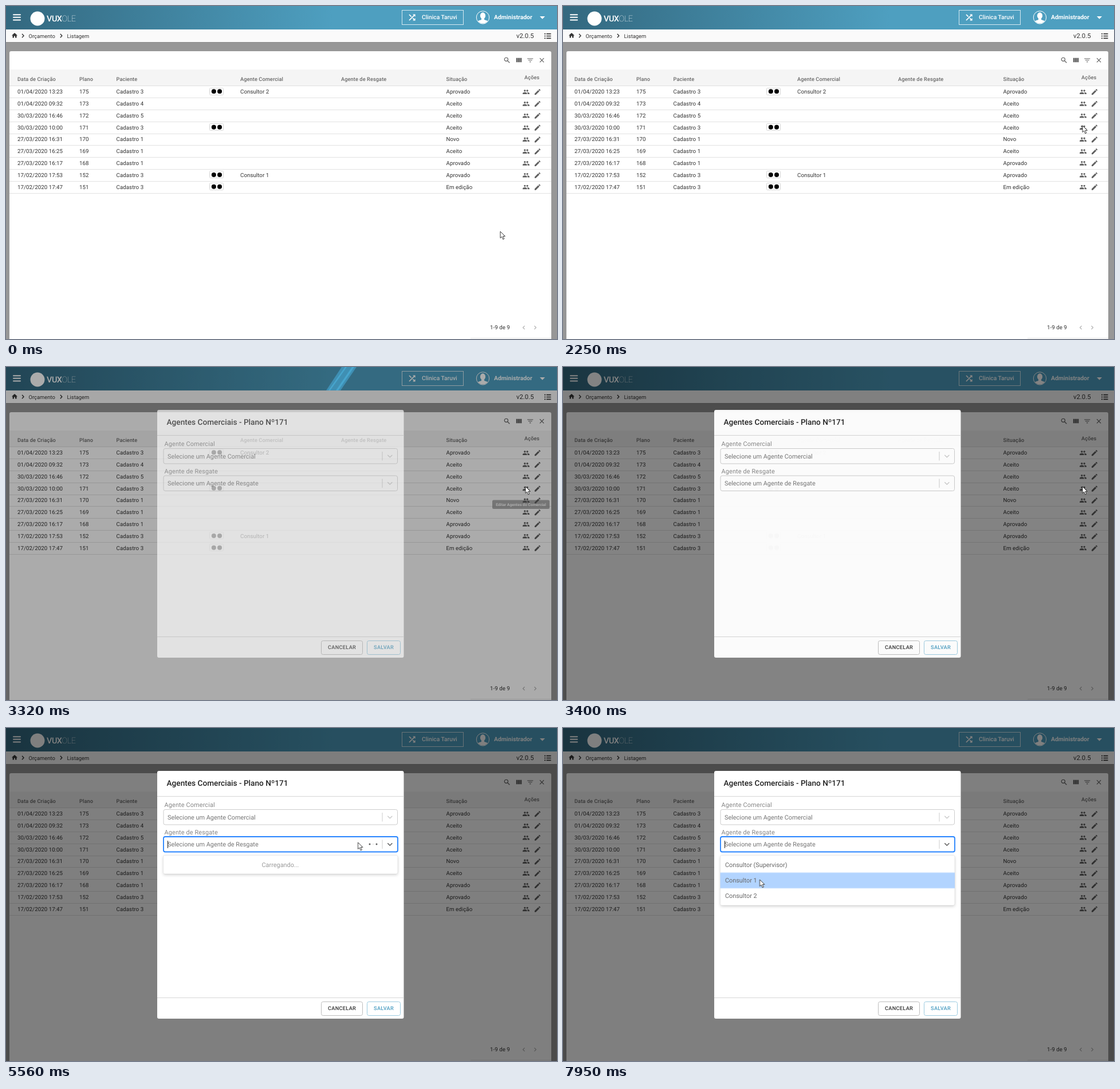
Animation, 962 px wide and 582 px high, one loop 8000 ms. Source, as an HTML page:

```html
<!DOCTYPE html>
<html lang="pt-BR">
<head>
<meta charset="utf-8">
<title>Listagem</title>
<style>
html, body { margin: 0; width: 100%; height: 100%; overflow: hidden; background: #979797; }
svg { display: block; }
text { font-family: Roboto, Arial, sans-serif; text-rendering: geometricPrecision; }
.head text { font-size: 9.2px; font-weight: 500; letter-spacing: .1px; fill: #686868; }
.cell text { font-size: 9.75px; letter-spacing: .03px; fill: #333; }
.crumb text { font-size: 9.4px; fill: #333; }
.label { font-size: 10.86px; letter-spacing: .15px; fill: #858585; }
.field { font-size: 10.86px; fill: #757575; }
.option { font-size: 10.86px; fill: #666; }
.button { font-size: 9.2px; font-weight: 500; letter-spacing: .3px; text-anchor: middle; }
.line { fill: none; stroke: #ccc; }

/* One cycle is 8 s, so 1% is 80 ms. */
.cursor, .shade, .spot, .tip, .veil, .shine, .hover, .focus, .loading, .menu, .pick, .caret {
  animation: 8s step-end infinite;
}
.cursor { animation-name: cursor; animation-timing-function: ease-in-out; }
.shade { animation-name: shade; }
.spot { animation-name: spot; }
.tip { animation-name: tip; }
.veil { animation-name: veil; }
.shine { animation-name: shine; }
.hover { animation-name: hover; }
.focus { animation-name: focus; }
.loading { animation-name: loading; }
.menu { animation-name: menu; }
.pick { animation-name: pick; }
.caret { animation-name: caret; }
.dot { animation: pulse 1s ease-in-out infinite; }

@keyframes cursor {
  0%, 7% { transform: translate(863px, 394px); }
  17.25% { transform: translate(866px, 229px); }
  18.25%, 19.3% { transform: translate(866px, 219px); }
  28.1%, 48.5% { transform: translate(907px, 209px); }
  56%, 59.2% { transform: translate(756px, 162px); }
  63.75%, 83.2% { transform: translate(614.5px, 200px); }
  93.6%, 100% { transform: translate(343.5px, 265px); }
}
@keyframes shade {
  0% { opacity: 0; transform: translateY(166.4px); }
  12.5% { opacity: 1; transform: translateY(166.4px); }
  13.2% { opacity: 1; transform: translateY(145.6px); }
  13.9% { opacity: 1; transform: translateY(124.8px); }
  14.7% { opacity: 1; transform: translateY(104px); }
  15.8% { opacity: 1; transform: translateY(83.2px); }
  20.1% { opacity: 1; transform: translateY(62.4px); }
  28.1%, 100% { opacity: 0; transform: translateY(62.4px); }
}
@keyframes spot { 0% { opacity: 0; } 28.8% { opacity: 1; } 41.45%, 100% { opacity: 0; } }
@keyframes tip {
  0% { opacity: 0; }
  37.7% { opacity: .35; }
  38.7% { opacity: .8; }
  39.6% { opacity: 1; }
  41.45% { opacity: .5; }
  42.45%, 100% { opacity: 0; }
}
@keyframes veil { 0% { opacity: 0; } 41.45% { opacity: .66; } 42.45% { opacity: .97; } 43.45%, 100% { opacity: 1; } }
@keyframes shine { 0% { opacity: 0; } 41.45% { opacity: 1; } 42.45%, 100% { opacity: 0; } }
@keyframes hover { 0% { opacity: 0; } 62.7% { opacity: 1; } 66.6%, 100% { opacity: 0; } }
@keyframes focus { 0% { opacity: 0; } 66.6%, 100% { opacity: 1; } }
@keyframes loading { 0% { opacity: 0; } 66.6% { opacity: 1; } 82.95%, 100% { opacity: 0; } }
@keyframes menu { 0% { opacity: 0; } 82.95%, 100% { opacity: 1; } }
@keyframes pick {
  0% { transform: none; fill: #deebff; }
  90.7% { transform: translateY(27.4px); fill: #deebff; }
  98.3%, 100% { transform: translateY(27.4px); fill: #b2d4ff; }
}
@keyframes caret {
  0% { opacity: 0; }
  66.6% { opacity: 1; }
  73.85% { opacity: 0; }
  80.5% { opacity: 1; }
  87.1% { opacity: 0; }
  93.6%, 100% { opacity: 1; }
}
@keyframes pulse { 0%, 80%, 100% { opacity: .1; } 40% { opacity: 1; } }
</style>
</head>
<body>
<svg width="962" height="582" viewBox="0 0 962 582">
  <defs>
    <linearGradient id="bar" gradientUnits="userSpaceOnUse" x1="0" y1="0" x2="570" y2="30">
      <stop offset="0" stop-color="#33687f"/>
      <stop offset="1" stop-color="#4e9fc0"/>
    </linearGradient>
    <filter id="drop" x="-10%" y="-30%" width="120%" height="180%">
      <feDropShadow dx="0" dy="2" stdDeviation="2.4" flood-opacity=".16"/>
    </filter>
    <clipPath id="face"><circle cx="832.5" cy="20" r="10.5"/></clipPath>
    <symbol id="people" viewBox="0 0 24 24"><path d="M16 11c1.66 0 2.99-1.34 2.99-3S17.66 5 16 5s-3 1.34-3 3 1.34 3 3 3zm-8 0c1.66 0 2.99-1.34 2.99-3S9.66 5 8 5 5 6.34 5 8s1.34 3 3 3zm0 2c-2.33 0-7 1.17-7 3.5V19h14v-2.5c0-2.33-4.67-3.5-7-3.5zm8 0c-.29 0-.62.02-.97.05 1.16.84 1.97 1.97 1.97 3.45V19h6v-2.5c0-2.33-4.67-3.5-7-3.5z"/></symbol>
    <symbol id="edit" viewBox="0 0 24 24"><path d="M3 17.25V21h3.75L17.81 9.94l-3.75-3.75zM20.71 7.04a1 1 0 0 0 0-1.41l-2.34-2.34a1 1 0 0 0-1.41 0l-1.83 1.83 3.75 3.75z"/></symbol>
    <symbol id="search" viewBox="0 0 24 24"><path d="M14 14l6 6" fill="none" stroke="#616161" stroke-width="2.4"/><circle cx="9.5" cy="9.5" r="5.5" fill="none" stroke="#616161" stroke-width="2.1"/></symbol>
    <symbol id="columns" viewBox="0 0 24 24"><path d="M10 18h5V5h-5zM4 18h5V5H4zM16 5v13h5V5z"/></symbol>
    <symbol id="filter" viewBox="0 0 24 24"><path d="M10 18h4v-2h-4zM3 6v2h18V6zm3 7h12v-2H6z"/></symbol>
    <symbol id="close" viewBox="0 0 24 24"><path d="M5.7 5.7l12.6 12.6M18.3 5.7L5.7 18.3" stroke="#616161" stroke-width="2.1"/></symbol>
    <symbol id="home" viewBox="0 0 24 24"><path d="M10 20v-6h4v6h5v-8h3L12 3 2 12h3v8z"/></symbol>
    <symbol id="shuffle" viewBox="0 0 24 24"><path d="M10.59 9.17L5.41 4 4 5.41l5.17 5.17zM14.5 4l2.04 2.04L4 18.59 5.41 20 17.96 7.46 20 9.5V4zm.33 9.41l-1.41 1.41 3.13 3.13L14.5 20H20v-5.5l-2.04 2.04z" stroke="#fff" stroke-width=".8"/></symbol>
    <path id="chevron" d="M-3.6-1.8L0 1.8L3.6-1.8" fill="none" stroke-width="1.5" stroke-linecap="round"/>
  </defs>

  <rect width="962" height="582" fill="#979797"/>

  <!-- Top bar -->
  <rect width="962" height="41" fill="url(#bar)"/>
  <path d="M13 15.2h12M13 19.8h12M13 24.4h12" stroke="#fff" stroke-width="2" stroke-linecap="round"/>
  <circle cx="55" cy="22" r="12.5" fill="#fff"/>
  <text x="71" y="27" font-size="14.5" letter-spacing="-.5" fill="#fff"><tspan font-weight="500">VUX</tspan><tspan font-weight="200">OLE</tspan></text>
  <rect x="691.5" y="7.5" width="107" height="25" fill="none" stroke="#d5e9f1"/>
  <use href="#shuffle" x="701" y="12" width="16" height="16" fill="#fff"/>
  <text x="726" y="23.3" font-size="10.3" font-weight="500" fill="#fff">Clinica Taruvi</text>
  <circle cx="832.5" cy="20" r="11.2" fill="none" stroke="#fff"/>
  <g clip-path="url(#face)" fill="#fff">
    <ellipse cx="832.5" cy="17" rx="4.6" ry="5.8"/>
    <path d="M830 21h5v3q7 1.500 8 5v4h-21v-4q1-3.500 8-5z"/>
  </g>
  <text x="852" y="23.3" font-size="10.4" font-weight="700" fill="#fff">Administrador</text>
  <path d="M932 18h9l-4.500 4.800z" fill="#fff"/>

  <!-- Breadcrumb -->
  <g class="crumb">
    <rect y="41" width="962" height="22" fill="#fafafa"/>
    <rect y="63" width="962" height="1" fill="#000" opacity=".1"/>
    <use href="#home" x="9" y="45.500" width="12" height="12" fill="#333"/>
    <path d="M28 48.800l3 3.200-3 3.200M94.800 48.800l3 3.200-3 3.200" fill="none" stroke="#333" stroke-width="1.400"/>
    <text x="39.500" y="56">Orçamento</text>
    <text x="106.500" y="56">Listagem</text>
    <text x="891" y="56" style="font-size:11.300px">v2.0.5</text>
    <path d="M943.500 48.700h8M943.500 52.500h8M943.500 56.300h8M940 48.700h2M940 52.500h2M940 56.300h2" stroke="#333" stroke-width="1.700"/>
  </g>

  <!-- Table -->
  <path d="M6 582V82q0-3 3-3h940q3 0 3 3v500z" fill="#fff"/>
  <g fill="#616161">
    <use href="#search" x="868" y="88" width="13.500" height="13.500"/>
    <use href="#columns" x="888.500" y="88" width="13.500" height="13.500"/>
    <use href="#filter" x="908.500" y="88" width="13.500" height="13.500"/>
    <use href="#close" x="928.800" y="88" width="13.500" height="13.500"/>
  </g>
  <rect x="6" y="111" width="946" height="28" fill="#f5f5f5"/>
  <rect x="6" y="139" width="946" height="1" fill="#e0e0e0"/>
  <rect class="shade" x="6" y="140" width="946" height="20" fill="#f4f4f4"/>
  <g class="head" id="head"></g>
  <g class="cell" id="rows"></g>
  <g class="cell"><text x="845" y="565.200">1-9 de 9</text></g>
  <path d="M905.500 559l-3 3 3 3M922.500 559l3 3-3 3" fill="none" stroke="#b0b0b0" stroke-width="1.100"/>
  <rect x="811" y="580" width="141" height="1" fill="#e6e6e6"/>
  <circle class="spot" cx="908" cy="212.500" r="8.500" fill="#000" fill-opacity=".08"/>
  <g class="tip">
    <rect x="849" y="232.500" width="100" height="15.500" rx="2.500" fill="#606060"/>
    <text x="899" y="242.700" font-size="6.850" font-weight="700" fill="#fff" text-anchor="middle">Editar Agentes do Comercial</text>
  </g>

  <!-- Dialog -->
  <g class="veil">
    <rect width="962" height="582" opacity=".5"/>
  </g>
  <g class="shine">
    <path d="M586 0h26l-28 41h-25z" fill="#3f8fb3"/>
    <path d="M592 0h3l-29 41h-3zM604 0h4l-28 41h-4z" fill="#47a5cd"/>
  </g>
  <g class="veil">
    <rect x="264" y="75" width="430.500" height="433" rx="3" fill="#fff"/>
    <text x="280.500" y="101.300" font-size="13.650" font-weight="500" fill="#222">Agentes Comerciais - Plano Nº171</text>
    <path d="M264 119.500h430.500M264 471.500h430.500" stroke="#d6d6d6"/>
    <g id="fields"></g>
    <rect x="550.500" y="478.500" width="72" height="24" rx="3" class="line" style="stroke:#bdbdbd"/>
    <text class="button" x="586.600" y="493.300" fill="#333">CANCELAR</text>
    <rect x="630.500" y="478.500" width="58" height="24" rx="3" class="line" style="stroke:#9ccbe0"/>
    <text class="button" x="659.600" y="493.300" fill="#4a9dc2">SALVAR</text>
  </g>

  <rect class="hover line" x="275" y="190" width="408.500" height="27" rx="3" style="stroke:#b0b0b0"/>
  <g class="focus">
    <rect x="275" y="190" width="409" height="26.500" rx="3" fill="none" stroke="#2684ff" stroke-width="1.800"/>
    <use href="#chevron" x="670.300" y="203.500" stroke="#666"/>
  </g>
  <rect class="caret" x="282" y="197" width="1" height="13" fill="#222"/>

  <g class="loading">
    <g fill="#555">
      <circle class="dot" cx="635" cy="203" r="1.500" style="animation-delay:-.9s"/>
      <circle class="dot" cx="641" cy="203" r="1.500" style="animation-delay:-.22s"/>
      <circle class="dot" cx="647" cy="203" r="1.500" style="animation-delay:-.78s"/>
    </g>
    <rect x="274.500" y="222.500" width="409.500" height="32.500" rx="3" fill="#fff" stroke="#000" stroke-opacity=".08" filter="url(#drop)"/>
    <text class="option" x="479" y="242.700" text-anchor="middle" style="fill:#999">Carregando...</text>
  </g>

  <g class="menu">
    <rect x="274.500" y="222.500" width="409.500" height="87.500" rx="3" fill="#fff" stroke="#000" stroke-opacity=".08" filter="url(#drop)"/>
    <rect class="pick" x="274.500" y="225.300" width="409.500" height="27.400"/>
    <g id="options"></g>
  </g>

  <path class="cursor" d="M0 0v11.600l2.700-2.500 2 4.700 2.100-.9-2-4.500h3.600z" fill="#fff" stroke="#222" stroke-width=".9"/>
</svg>
<script>
const put = (id, parts) => { document.getElementById(id).innerHTML = parts.join(''); };
const text = (x, y, s, cls = '') => `<text x="${x}" y="${y}" class="${cls}">${s}</text>`;
const icon = (name, x, y, size) =>
  `<use href="#${name}" x="${x - size / 2}" y="${y - size / 2}" width="${size}" height="${size}" fill="#616161"/>`;

const cols = [20, 128, 192.5, 409, 585, 768.5];
const titles = ['Data de Criação', 'Plano', 'Paciente', 'Agente Comercial', 'Agente de Resgate', 'Situação'];
put('head', [...titles.map((s, i) => text(cols[i], 131.4, s)), text(905, 128, 'Ações')]);

// Date, plan, client, agent, status, badge
const plans = [
  ['01/04/2020 13:23', 175, 3, 2, 'Aprovado', true],
  ['01/04/2020 09:32', 173, 4, 0, 'Aceito'],
  ['30/03/2020 16:46', 172, 5, 0, 'Aceito'],
  ['30/03/2020 10:00', 171, 3, 0, 'Aceito', true],
  ['27/03/2020 16:31', 170, 1, 0, 'Novo'],
  ['27/03/2020 16:25', 169, 1, 0, 'Aceito'],
  ['27/03/2020 16:17', 168, 1, 0, 'Aprovado'],
  ['17/02/2020 17:53', 152, 3, 1, 'Aprovado', true],
  ['17/02/2020 17:47', 151, 3, 0, 'Em edição', true],
];
const badge = y => `<rect x="355.5" y="${Math.round(y) - 6.5}" width="24" height="12" rx="1" fill="#fff" stroke="#d8d8d8"/>
  <circle cx="362.8" cy="${y - .3}" r="4"/><circle cx="373" cy="${y - .3}" r="4"/>`;

put('rows', plans.map(([date, plan, client, agent, status, marked], i) => {
  const y = 149.6 + 20.8 * i;
  const cells = [date, plan, `Cadastro ${client}`, agent ? `Consultor ${agent}` : '', '', status];
  return cells.map((s, c) => s && text(cols[c], y + 3.5, s)).join('')
    + (marked ? badge(y) : '')
    + icon('people', 908, y + .5, 13) + icon('edit', 928, y + .6, 13.5)
    + `<rect x="6" y="${Math.round(y + 10.6)}" width="946" height="1" fill="#e2e2e2"/>`;
}));

put('fields', ['Agente Comercial', 'Agente de Resgate'].map((name, i) => {
  const y = 142.5 + 47.5 * i;
  return text(276.5, y - 4.5, name, 'label')
    + `<rect class="line" x="275" y="${y}" width="408.5" height="26.5" rx="3"/>`
    + text(282, y + 17, `Selecione um ${name}`, 'field')
    + `<path class="line" d="M657 ${y + 5.5}v15.5"/>`
    + `<use href="#chevron" x="670.3" y="${y + 13.5}" stroke="#ccc"/>`;
}));

put('options', ['(Supervisor)', '1', '2'].map((s, i) => text(283, 242.6 + 27.4 * i, `Consultor ${s}`, 'option')));
</script>
</body>
</html>
```
